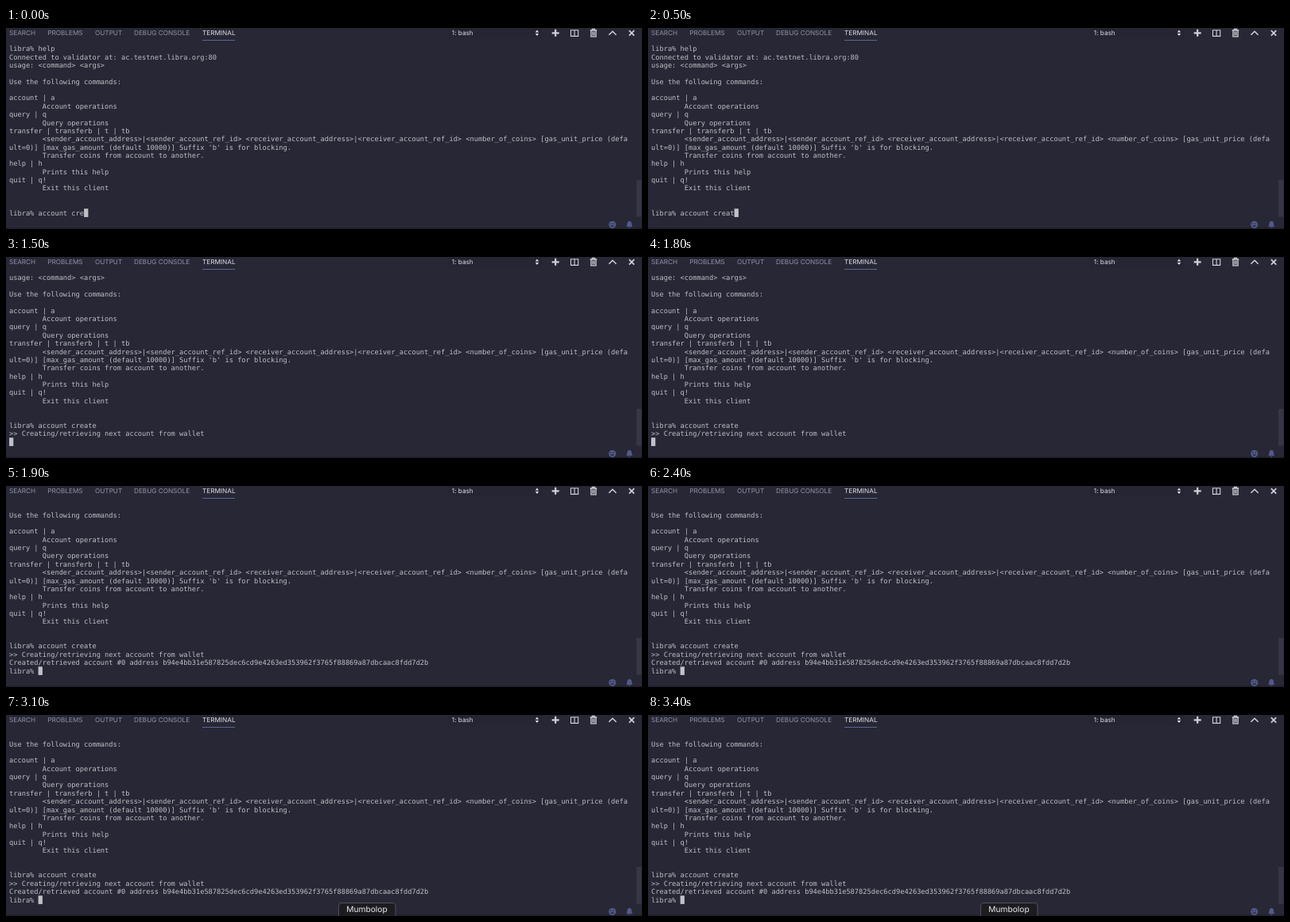
Animation of 800 by 254 pixels, one loop 3600 ms. Source, as an HTML page:

```html
<!DOCTYPE html>
<html lang="en">
<head>
<meta charset="utf-8">
<title>Terminal session</title>
<style>
  html, body { margin: 0; width: 100%; height: 100%; overflow: hidden; background: #272736; }
  svg { display: block; width: 800px; height: 254px; }
  text { text-rendering: geometricPrecision; white-space: pre; }
  .ui { font: 8.2px Inter, sans-serif; fill: #9092a4; }
  .ui .active { fill: #dedee6; }
  #screen { font: 8.684px "DejaVu Sans Mono", monospace; fill: #c0c0c6; }
  .icons { fill: none; stroke: #d0d0d7; stroke-width: 1.3; }
  .status { fill: #525a8a; }
</style>
</head>
<body>
<svg viewBox="0 0 800 254">
  <rect width="800" height="254" fill="#272736"/>
  <rect y="252.6" width="800" height="1.4" fill="#20202b"/>

  <g class="ui">
    <text x="4" y="9.4">SEARCH</text>
    <text x="52.3" y="9.4">PROBLEMS</text>
    <text x="112" y="9.4">OUTPUT</text>
    <text x="161" y="9.4">DEBUG CONSOLE</text>
    <text x="247" y="9.4" class="active">TERMINAL</text>
    <rect x="247" y="15" width="41" height="1" fill="#5c678f"/>
    <rect x="556" y="-1" width="117.5" height="13.5" fill="#252533"/>
    <text x="560.8" y="9.3" class="active">1: bash</text>
    <path d="M665.8 5.5 L668 2.6 L670.2 5.5Z M665.8 7 L668 9.9 L670.2 7Z" fill="#e0e0e4"/>
  </g>

  <g class="icons">
    <path d="M691.2 1.8 V10.8 M686.7 6.3 H695.7" stroke-width="2.2"/>
    <path d="M710.5 2.8 H719.7 V10.4 H710.5Z M715.1 2.8 V10.4" stroke-width="1.1"/>
    <path d="M734.8 3 H743.2 M737.4 2.6 V1.4 H740.6 V2.6 M735.9 3 V10.9 H742.1 V3 M738 4.5 V9.5 M740 4.5 V9.5"/>
    <path d="M758.4 8.8 L763 4.2 L767.6 8.8" stroke-width="1.5"/>
    <path d="M783.8 3.2 L790.2 9.6 M790.2 3.2 L783.8 9.6" stroke-width="1.7"/>
  </g>

  <rect x="793" y="192" width="6.5" height="46.5" fill="#363648"/>

  <g class="status">
    <circle cx="762.7" cy="248.5" r="4.5"/>
    <path d="M780 251.3 Q781.4 250 781.4 247.3 Q781.5 244.4 784.2 244 Q786.9 244.4 787 247.3 Q787 250 788.4 251.3Z M783 252 H785.4 L784.2 253.2Z"/>
    <g fill="#272736">
      <circle cx="761" cy="247.3" r="0.8"/>
      <circle cx="764.4" cy="247.3" r="0.8"/>
      <path d="M760 249.5 Q762.7 253 765.4 249.5Z"/>
    </g>
  </g>

  <g id="screen"></g>
  <rect id="cursor" width="5.3" height="10.6" fill="#c0c0c7"/>

  <g id="tooltip">
    <rect x="418.5" y="237.5" width="71.5" height="22" rx="3.5" fill="#1d1d21" stroke="#50505a"/>
    <text x="454" y="249.4" text-anchor="middle" fill="#ededf0" font-family="Inter, sans-serif" font-size="10.2">Mumbolop</text>
  </g>
</svg>

<script>
const LOOP = 3600, ROWS = 21;
const LEFT = 4, CHAR = 5.228, FIRST_BASELINE = 29.3, PITCH = 10.36;

const HELP = `libra% help
Connected to validator at: ac.testnet.libra.org:80
usage: <command> <args>

Use the following commands:

account | a
        Account operations
query | q
        Query operations
transfer | transferb | t | tb
        <sender_account_address>|<sender_account_ref_id> <receiver_account_address>|<receiver_account_ref_id> <number_of_coins> [gas_unit_price (defa
ult=0)] [max_gas_amount (default 10000)] Suffix 'b' is for blocking.
        Transfer coins from account to another.
help | h
        Prints this help
quit | q!
        Exit this client

`.split("\n");

const PROMPT = "libra% ";
const COMMAND = "account create";
const KEY_TIMES = [200, 500, 900];
const REPLY_START = 1500, REPLY_DONE = 1900, TOOLTIP_START = 3000;

const screen = document.getElementById("screen");
const cursor = document.getElementById("cursor");
const tooltip = document.getElementById("tooltip");
const baseline = row => FIRST_BASELINE + row * PITCH;

const rows = Array.from({ length: ROWS }, (_, row) => {
  const text = document.createElementNS("http://www.w3.org/2000/svg", "text");
  text.setAttribute("x", LEFT);
  text.setAttribute("y", baseline(row));
  return screen.appendChild(text);
});

function terminalLines(time) {
  const pending = KEY_TIMES.filter(t => time < t).length;
  const lines = [...HELP, PROMPT + COMMAND.slice(0, COMMAND.length - pending)];
  if (time >= REPLY_START) lines.push(">> Creating/retrieving next account from wallet");
  if (time >= REPLY_DONE) {
    lines.push("Created/retrieved account #0 address b94e4bb31e587825dec6cd9e4263ed353962f3765f88869a87dbcaac8fdd7d2b", PROMPT);
  } else if (time >= REPLY_START) {
    lines.push("");
  }
  return lines.slice(-ROWS);
}

function draw(now) {
  const time = now % LOOP;
  const lines = terminalLines(time);
  rows.forEach((text, i) => {
    if (text.textContent !== lines[i]) text.textContent = lines[i];
  });
  cursor.setAttribute("x", LEFT + lines[ROWS - 1].length * CHAR);
  cursor.setAttribute("y", baseline(ROWS - 1) - 8.2);
  tooltip.setAttribute("visibility", time >= TOOLTIP_START ? "visible" : "hidden");
}

const start = performance.now();
function tick() {
  draw(performance.now() - start);
  requestAnimationFrame(tick);
}
tick();
</script>
</body>
</html>
```
